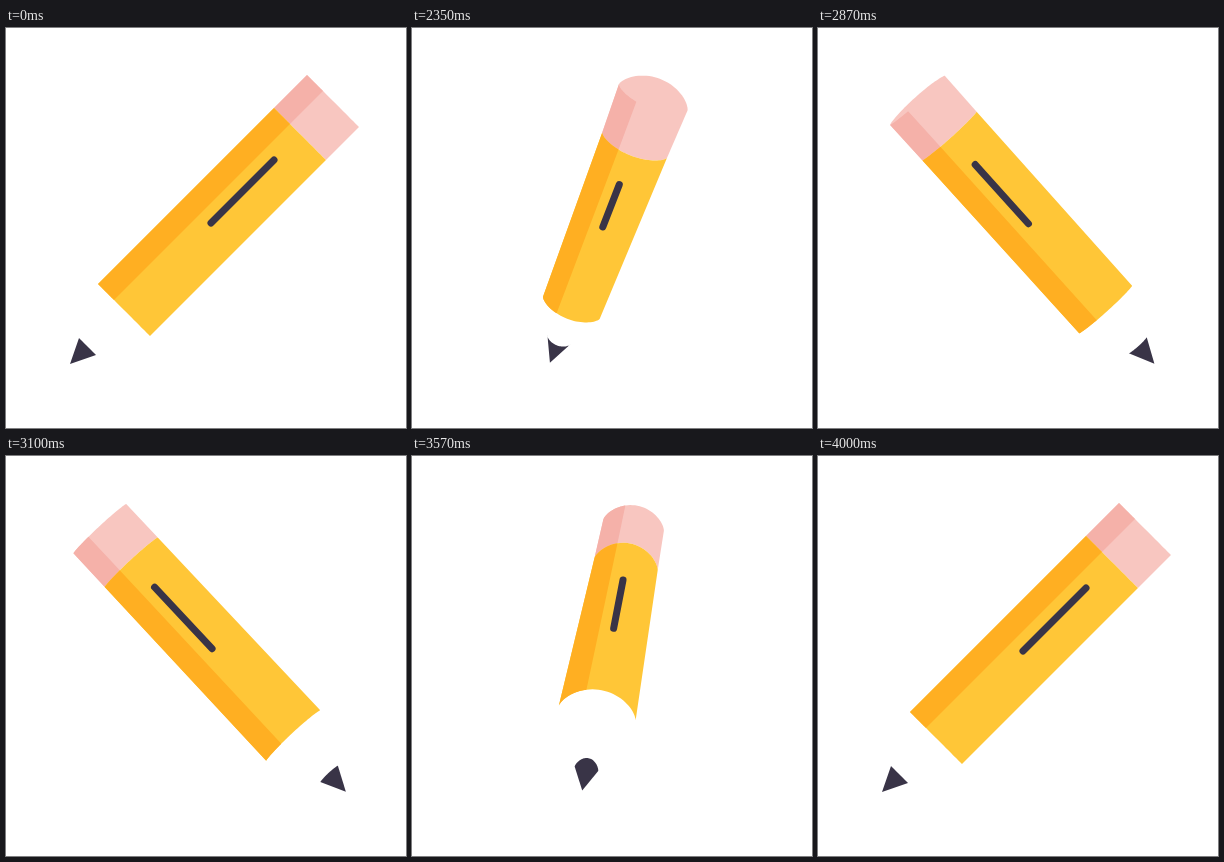
An HTML page with a canvas that plays this animation: 400x400 px, repeating every 4020 ms.

```html
<!DOCTYPE html>
<html lang="en">
<head>
<meta charset="utf-8">
<title>Turning pencil</title>
<style>
  html, body { margin: 0; width: 100%; height: 100%; overflow: hidden; background: #fff; }
  canvas { display: block; width: 400px; height: 400px; }
</style>
</head>
<body>
<canvas id="stage"></canvas>
<script>
const canvas = document.getElementById('stage');
const ctx = canvas.getContext('2d');
const density = Math.max(1, window.devicePixelRatio || 1);
canvas.width = canvas.height = 400 * density;
ctx.scale(density, density);

const LOOP = 4020;
const STEP = 25;          // ms per step of the turn
const REST = 80;          // steps before the turn starts
const TURN = 4.5;         // degrees per step
const SHADE = Math.acos(0.385);
const color = {
  eraser: '#f8c6c0', eraserShade: '#f5b1a9',
  body: '#ffc637', bodyShade: '#ffaf22',
  ink: '#393447'
};

// Pose of the pencil seen while it turns about an upright axis.
function makePose(angle) {
  const c = Math.cos(angle);
  const s = Math.sin(angle);
  const depth = s * s;
  // A value at the side view, shifted towards the back or front view.
  const mix = (side, back, front) => side + depth * (s > 0 ? back : front);
  const slope = c * (1 - 0.18 * depth);
  const tip = { x: 205 - 141 * c * (1 + 0.06 * depth), y: mix(336, -1.5, -1.5) };
  const len = Math.hypot(slope, 1);
  const down = { x: -slope / len, y: 1 / len };
  const onAxis = (...y) => {
    const py = mix(...y);
    return { x: tip.x + slope * (tip.y - py), y: py };
  };
  const rim = (y, half, back, front) => ({
    ...onAxis(...y), half: mix(...half), bulge: mix(0, back, front)
  });
  // Slightly flatter than an ellipse near its ends.
  const rimPoint = (r, turn) => {
    const across = -Math.cos(turn) * r.half;
    const along = Math.abs(Math.sin(turn)) ** 1.35 * r.bulge;
    return {
      x: r.x + across * down.y + along * down.x,
      y: r.y - across * down.x + along * down.y
    };
  };
  const arc = (r, end = Math.PI) =>
    Array.from({ length: 41 }, (_, i) => rimPoint(r, end * i / 40));
  return { s, tip, onAxis, rim, arc };
}

function fill(points, style) {
  ctx.beginPath();
  points.forEach(p => ctx.lineTo(p.x, p.y));
  ctx.closePath();
  ctx.fillStyle = style;
  ctx.fill();
}

function draw(angle) {
  const { s, tip, onAxis, rim, arc } = makePose(angle);
  const band = (a, b, style, end) => fill([...arc(a, end), ...arc(b, end).reverse()], style);

  const top = rim([73, -4.4, -4], [36.75, 0, -6.3], 14, -21);
  const farTop = { ...top, bulge: s > 0 ? -25 * s * s : top.bulge };
  const collar = rim([106, 14, 2.5], [36.75, -2.5, -4.8], 14, -22.5);
  const base = rim([282, -3, -26], [36.75, -8, 2.5], 15, -25);
  const lead = rim([318.5, -8.5, -6], [12, 0.4, 0], 7.5, -11.5);

  ctx.fillStyle = '#fff';
  ctx.fillRect(0, 0, 400, 400);

  band(farTop, collar, color.eraser);
  band(top, collar, color.eraserShade, SHADE);
  band(collar, base, color.body);
  band(collar, base, color.bodyShade, SHADE);
  fill([...arc(lead), tip], color.ink);

  const from = onAxis(132, 31, -8.5);
  const to = onAxis(195, 5, -24);
  ctx.beginPath();
  ctx.moveTo(from.x, from.y);
  ctx.lineTo(to.x, to.y);
  ctx.lineWidth = 7;
  ctx.lineCap = 'round';
  ctx.strokeStyle = color.ink;
  ctx.stroke();
}

function frame() {
  const t = Math.floor(performance.now() % LOOP / 10) * 10;
  const step = Math.floor((t + 5) / STEP);
  draw(Math.max(0, step - REST) * TURN * Math.PI / 180);
  requestAnimationFrame(frame);
}
frame();
</script>
</body>
</html>
```
